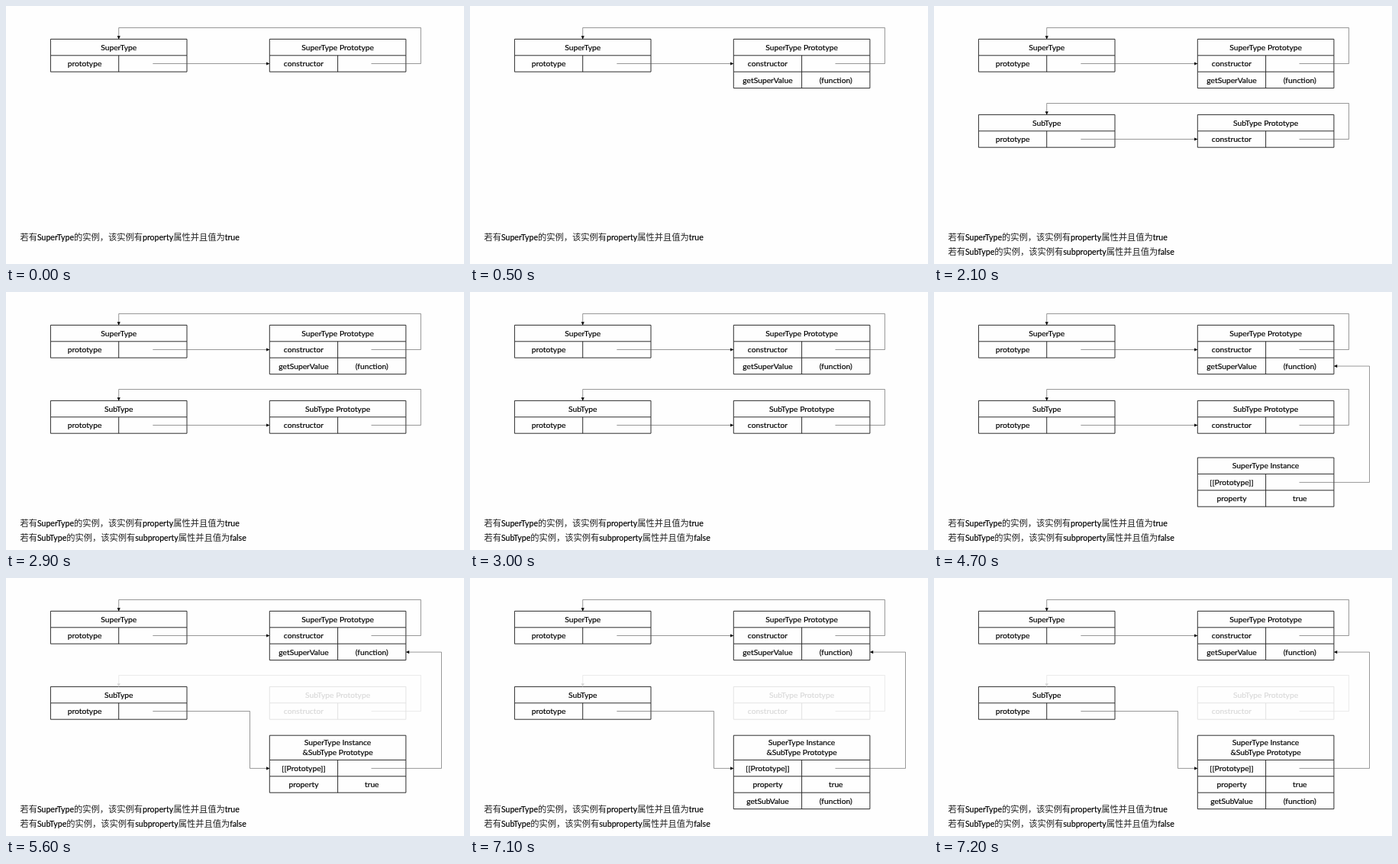
Recreate the animation shown at these times as an HTML page. Size 600x338 px, loop 8 s.

```html
<!DOCTYPE html>
<html lang="zh-CN">
<head>
<meta charset="utf-8">
<title>Prototype chain</title>
<style>
  html, body { margin: 0; width: 100%; height: 100%; overflow: hidden; background: #fefefe; }
  svg { display: block; width: 100vw; height: 100vh; }
  text { font: 10.3px Lato, "Open Sans", sans-serif; fill: #000; stroke: #000; stroke-width: .18; text-anchor: middle; }
  .note { font-size: 10.55px; text-anchor: start; }
  .cjk { font: 300 11.25px "Noto Sans CJK SC", "Noto Sans CJK", sans-serif; fill: #222; stroke: none; }
  .box { fill: none; stroke: #222; stroke-width: .95; }
  .wire { fill: none; stroke: #555; stroke-width: .6; }
  .head { fill: #000; }
  .faded text { fill: #d9d9d9; stroke: #d9d9d9; }
  .faded .box { stroke: #e2e2e2; }
  .faded .wire { stroke: #e0e0e0; }
  .faded .head { fill: #d9d9d9; }
</style>
</head>
<body>
<svg id="stage" viewBox="0 0 600 338"></svg>
<script>
const LOOP = 8000, ROW = 21.4, WIDTH = 178.6, LEFT = 58.4, RIGHT = 345.3;
const stage = document.getElementById('stage');

function add(parent, tag, attrs, content) {
  const el = document.createElementNS('http://www.w3.org/2000/svg', tag);
  for (const key in attrs) el.setAttribute(key, attrs[key]);
  if (content) el.textContent = content;
  return parent.appendChild(el);
}

const label = (g, x, mid, str) => add(g, 'text', { x, y: mid + 3.6 }, str);

function title(g, x, top, bottom, ...lines) {
  add(g, 'path', { class: 'box', d: `M${x} ${top}h${WIDTH}V${bottom}h${-WIDTH}z` });
  const mid = (top + bottom) / 2;
  lines.forEach((str, i) =>
    label(g, x + WIDTH / 2, mid + (i - (lines.length - 1) / 2) * 13, str));
}

// The line above a row belongs to the part above it.
function row(g, x, top, key, value) {
  const half = WIDTH / 2;
  add(g, 'path', { class: 'box', d: `M${x} ${top}v${ROW}h${WIDTH}v${-ROW}M${x + half} ${top}v${ROW}` });
  label(g, x + half / 2, top + ROW / 2, key);
  if (value) label(g, x + half * 1.5, top + ROW / 2, value);
}

// The arrow head sits at the last point, turned along the last leg.
function arrow(g, ...pts) {
  const [x, y] = pts[pts.length - 1], [px, py] = pts[pts.length - 2];
  const turn = Math.atan2(y - py, x - px) * 180 / Math.PI;
  add(g, 'path', { class: 'wire', d: 'M' + pts.join('L') });
  add(g, 'path', { class: 'head', d: 'M0 0L-4.2 -2.1V2.1z', transform: `translate(${x} ${y}) rotate(${turn})` });
}

function typeBox(g, name, top) {
  title(g, LEFT, top, top + ROW, name);
  row(g, LEFT, top + ROW, 'prototype');
}

function protoBox(g, name, top) {
  const y = top + ROW * 1.5;
  title(g, RIGHT, top, top + ROW, name + ' Prototype');
  row(g, RIGHT, top + ROW, 'constructor');
  arrow(g, [478.5, y], [543.5, y], [543.5, top - 14.9], [147.7, top - 14.9], [147.7, top]);
}

function note(g, y, type, prop, value) {
  const line = add(g, 'text', { class: 'note', x: 18.4, y });
  ['若有', type, '的实例\uff0c该实例有', prop, '属性并且值为', value].forEach((part, i) =>
    add(line, 'tspan', i % 2 ? {} : { class: 'cjk' }, part));
}

// Each scene part: start, end, draw, optional class.
const parts = [
  [0, LOOP, g => {
    typeBox(g, 'SuperType', 43.4);
    protoBox(g, 'SuperType', 43.4);
    arrow(g, [192.3, 75.5], [345.3, 75.5]);
    note(g, 307.3, 'SuperType', 'property', 'true');
  }],
  [500, LOOP, g => row(g, RIGHT, 86.2, 'getSuperValue', '(function)')],
  [2100, LOOP, g => {
    typeBox(g, 'SubType', 142.4);
    note(g, 325.6, 'SubType', 'subproperty', 'false');
  }],
  [2100, 5600, g => {
    protoBox(g, 'SubType', 142.4);
    arrow(g, [192.3, 174.5], [345.3, 174.5]);
  }],
  [5600, LOOP, g => protoBox(g, 'SubType', 142.4), 'faded'],
  [3900, LOOP, g => {
    row(g, RIGHT, 238.4, '[[Prototype]]');
    row(g, RIGHT, 259.8, 'property', 'true');
    arrow(g, [478.5, 249.4], [570.5, 249.4], [570.5, 97.1], [524, 97.1]);
  }],
  [3900, 5600, g => title(g, RIGHT, 217, 238.4, 'SuperType Instance')],
  [5600, LOOP, g => {
    title(g, RIGHT, 206.2, 238.4, 'SuperType Instance', '&SubType Prototype');
    arrow(g, [192.3, 174.5], [319.5, 174.5], [319.5, 249.4], [345.3, 249.4]);
  }],
  [7100, LOOP, g => row(g, RIGHT, 281.2, 'getSubValue', '(function)')]
].map(([from, to, draw, cls]) => {
  const g = add(stage, 'g', cls ? { class: cls } : {});
  draw(g);
  return { g, from, to };
});

const start = performance.now();
function tick(now) {
  const t = Math.max(0, now - start) % LOOP;
  for (const { g, from, to } of parts) g.style.display = t >= from && t < to ? '' : 'none';
  requestAnimationFrame(tick);
}
tick(start);
</script>
</body>
</html>
```
